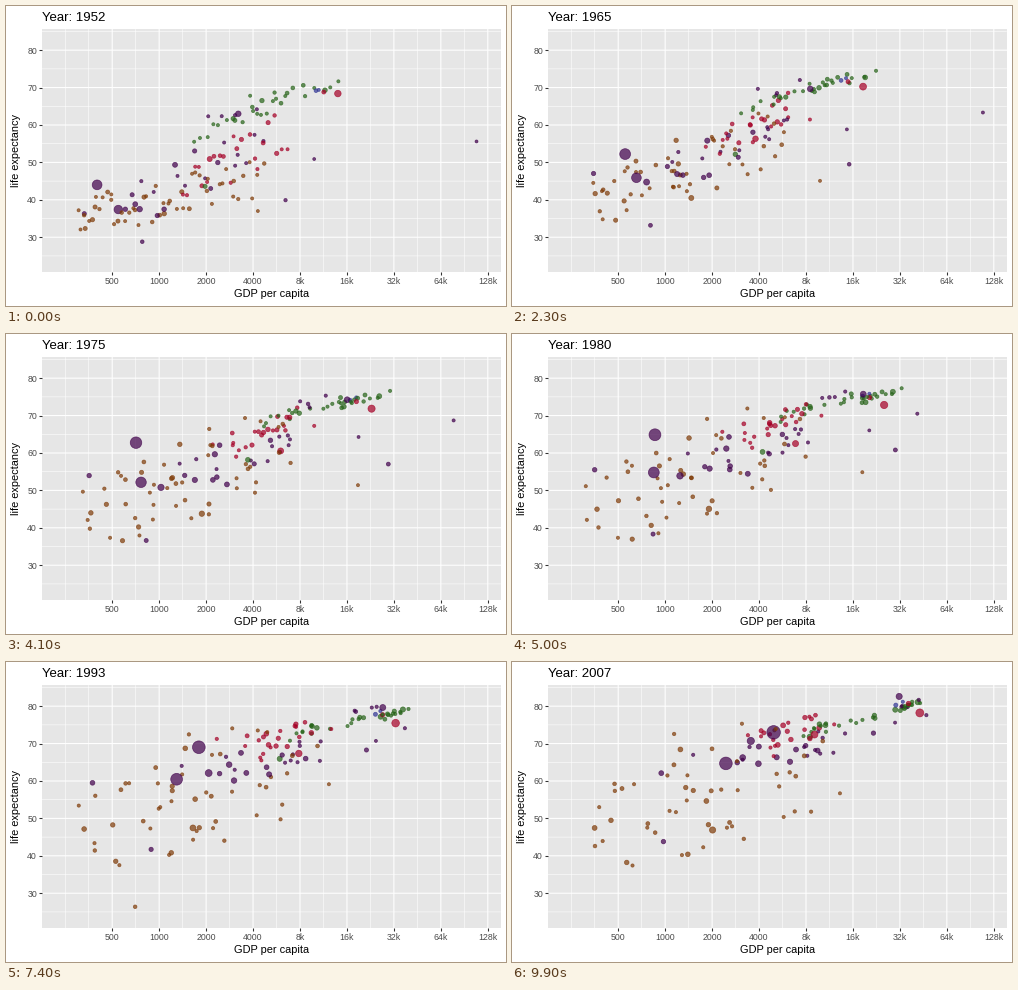
Animation, 500 px wide and 300 px high, one loop 10 s. Source, as a matplotlib script:

```python
import numpy as np
import matplotlib.pyplot as plt
from matplotlib.animation import FuncAnimation

W, H = 500, 300
LEFT, RIGHT, TOP, BOTTOM = 36, 494.5, 23.4, 266.2
FRAMES, STEP = 100, 9
FIRST, LAST = 1952, 2007
YEARS = np.arange(FIRST, LAST + 1, 5)
T = (YEARS - FIRST) / (LAST - FIRST)
AFRICA, AMERICAS, ASIA, EUROPE, OCEANIA = (
    "#7F3B08", "#A50026", "#40004B", "#276419", "#313695")
MAX_POP = 1319

rng = np.random.default_rng(7)
colors, gdps, lives, sizes = [], [], [], []


def add(color, log_gdp, life, pop0, pop1):
    size = 1 + 5 * np.sqrt((pop0 + (pop1 - pop0) * T) / MAX_POP)
    radius = 0.375 * (size * 2.845 + 0.945)
    colors.append(color)
    gdps.append(log_gdp)
    lives.append(life)
    sizes.append((2 * radius) ** 2)


def track(color, pop0, pop1, *points):
    """One bubble through a few (year, gdp, life) points; population in millions."""
    year, gdp, life = np.array(points, float).T
    add(color, np.interp(YEARS, year, np.log2(gdp)),
        np.interp(YEARS, year, life), pop0, pop1)


def ease_out(power):
    return 1 - (1 - T) ** power


def bridge(sd):
    """Random walk that starts and ends at zero."""
    walk = np.cumsum(rng.normal(0, sd, len(T)))
    return walk - walk[0] - (walk[-1] - walk[0]) * T


def crowd(color, n, gdp0, gdp1, life0, life1, grow, rise, tie=0.6,
          wobble=0.1, skew=1.0, max_pop=50):
    """Bubbles spread between (low, high) bounds that ease to new bounds."""
    def between(bounds, rank):
        return bounds[0] + (bounds[1] - bounds[0]) * rank ** skew

    for i in range(n):
        u = (i + rng.random()) / n
        a, b, c = tie * u + (1 - tie) * rng.random(3)
        x0, x1 = between(np.log2(gdp0), u), between(np.log2(gdp1), a)
        y0, y1 = between(life0, b), between(life1, c)
        pop = 1 + max_pop * rng.random() ** 4
        add(color, x0 + (x1 - x0) * ease_out(grow) + bridge(wobble),
            y0 + (y1 - y0) * ease_out(rise) + bridge(5 * wobble),
            pop, 2 * pop)


# Broad groups
crowd(AFRICA, 49, (300, 4800), (280, 14000), (30, 52), (37, 78),
      grow=1.6, rise=2.8, tie=.5, wobble=.15, skew=1.2, max_pop=28)
crowd(AMERICAS, 22, (1400, 7000), (2600, 14000), (37, 65), (65, 79.5),
      grow=1.5, rise=1.9, tie=.5, max_pop=30)
crowd(ASIA, 20, (550, 4800), (1000, 24000), (32, 60), (59, 78),
      grow=1.4, rise=1.5, tie=.5, max_pop=65)
crowd(ASIA, 4, (1800, 4600), (24000, 50000), (59, 66), (78, 82.5),
      grow=1.2, rise=1.8, max_pop=8)
crowd(EUROPE, 13, (3500, 14700), (27500, 50000), (64, 73), (78.3, 82),
      grow=1.8, rise=1.25, wobble=.04)
crowd(EUROPE, 16, (1600, 7000), (5900, 26000), (55, 69), (71.5, 78.5),
      grow=2.3, rise=2.4, tie=.75, wobble=.06, max_pop=30)
crowd(OCEANIA, 2, (9900, 10600), (24000, 36000), (69, 69.4), (80, 81.3),
      grow=1.2, rise=1.1, wobble=.02, max_pop=10)

# Large bubbles and stragglers
track(ASIA, 556, 1319, (1952, 400, 44), (1957, 576, 50.5), (1962, 488, 44.5),
      (1967, 613, 58.4), (1977, 741, 64), (1992, 1656, 68.7), (2007, 4959, 73))
track(ASIA, 372, 1110, (1952, 547, 37.4), (1972, 724, 50.7),
      (1987, 977, 58.6), (2007, 2452, 64.7))
track(ASIA, 86, 127, (1952, 3217, 63), (1972, 14779, 73.4),
      (1992, 26825, 79.4), (2007, 31656, 82.6))
track(ASIA, 82, 224, (1952, 750, 37.5), (1967, 762, 46), (2007, 3541, 70.7))
track(ASIA, .2, 2.5, (1952, 108382, 55.6), (1972, 109348, 67.7),
      (1982, 31354, 71.3), (2007, 47307, 77.6))
track(ASIA, 4, 28, (1952, 6460, 39.9), (1977, 34168, 58.7),
      (1987, 21198, 66.3), (2007, 21655, 72.8))
track(ASIA, .1, .7, (1952, 9867, 50.9), (1972, 18269, 63.3),
      (2007, 29796, 75.6))
track(ASIA, 20, 48, (1952, 331, 36.3), (1972, 357, 53.1),
      (1992, 347, 59.3), (2007, 944, 62.1))
track(ASIA, 8, 32, (1952, 779, 28.8), (1987, 852, 40.8), (2007, 975, 43.8))
track(AMERICAS, 158, 301, (1952, 13990, 68.4), (1972, 21806, 71.3),
      (2007, 42952, 78.2))
track(AMERICAS, 57, 190, (1952, 2109, 50.9), (1977, 6660, 61.5),
      (2007, 9066, 72.4))
track(AMERICAS, 15, 33, (1952, 11367, 68.8), (2007, 36319, 80.7))
track(EUROPE, 22, 71, (1952, 1969, 43.6), (1972, 3451, 57),
      (2007, 8458, 71.8))
track(AFRICA, 33, 135, (1952, 1077, 36.3), (1977, 1982, 44.5),
      (1992, 1620, 47.5), (2007, 2014, 46.9))
track(AFRICA, .4, 1.5, (1952, 4293, 37), (1977, 21746, 52.8),
      (1987, 11864, 60.2), (2007, 13206, 56.7))
track(AFRICA, 2.5, 8.9, (1952, 493, 40), (1987, 848, 44),
      (1992, 737, 23.6), (1997, 590, 36.1), (2007, 863, 46.2))

order = rng.permutation(len(colors))
colors = [colors[i] for i in order]
gdps, lives, sizes = (np.array(a)[order] for a in (gdps, lives, sizes))


def padded(lo, hi):
    pad = 0.05 * (hi - lo)
    return lo - pad, hi + pad


plt.rcParams["font.family"] = "Liberation Sans"
fig = plt.figure(figsize=(W / 72, H / 72), dpi=72, facecolor="white")
ax = fig.add_axes([LEFT / W, 1 - BOTTOM / H, (RIGHT - LEFT) / W,
                   (BOTTOM - TOP) / H], facecolor="#E6E6E6")
ax.set_xlim(*padded(np.log2(241.2), np.log2(113523)))
ax.set_ylim(*padded(23.6, 82.6))
ax.spines[:].set_visible(False)

x_major = np.log2(500) + np.arange(9)
ax.set_xticks(x_major, ["500", "1000", "2000", "4000", "8k", "16k", "32k",
                        "64k", "128k"])
ax.set_yticks(range(30, 81, 10))
ax.tick_params(length=2.75, width=1.07, color="#333333", labelcolor="#4D4D4D",
               labelsize=8.8, pad=2.2)
ax.set_axisbelow(True)
ax.grid(color="white", lw=1.07, snap=False)
for x in [x_major[0] - 1, *(x_major - 0.5)]:
    ax.axvline(x, color="white", lw=0.53, zorder=0.4, snap=False)
for y in range(25, 86, 10):
    ax.axhline(y, color="white", lw=0.53, zorder=0.4, snap=False)


def label(x, y, text, size, **kw):
    return fig.text(x / W, 1 - y / H, text, fontsize=size, color="black", **kw)


title = label(35.5, 15, "", 13.2, va="baseline")
label((LEFT + RIGHT) / 2, 291, "GDP per capita", 11, ha="center", va="baseline")
label(10, (TOP + BOTTOM) / 2, "life expectancy", 11, ha="center", va="center",
      rotation=90)

dots = ax.scatter(gdps[:, 0], lives[:, 0], s=sizes[:, 0], c=colors, alpha=0.7,
                  linewidths=0.71, zorder=3)


def update(i):
    k = min(i // STEP, len(YEARS) - 2)
    f = i / STEP - k

    def mix(a):
        return a[:, k] * (1 - f) + a[:, k + 1] * f

    dots.set_offsets(np.column_stack([mix(gdps), mix(lives)]))
    dots.set_sizes(mix(sizes))
    title.set_text(f"Year: {round(FIRST + (LAST - FIRST) * i / (FRAMES - 1))}")
    return dots, title


anim = FuncAnimation(fig, update, frames=FRAMES, interval=100, repeat=True,
                     repeat_delay=0, init_func=lambda: update(0))
plt.show()
```
